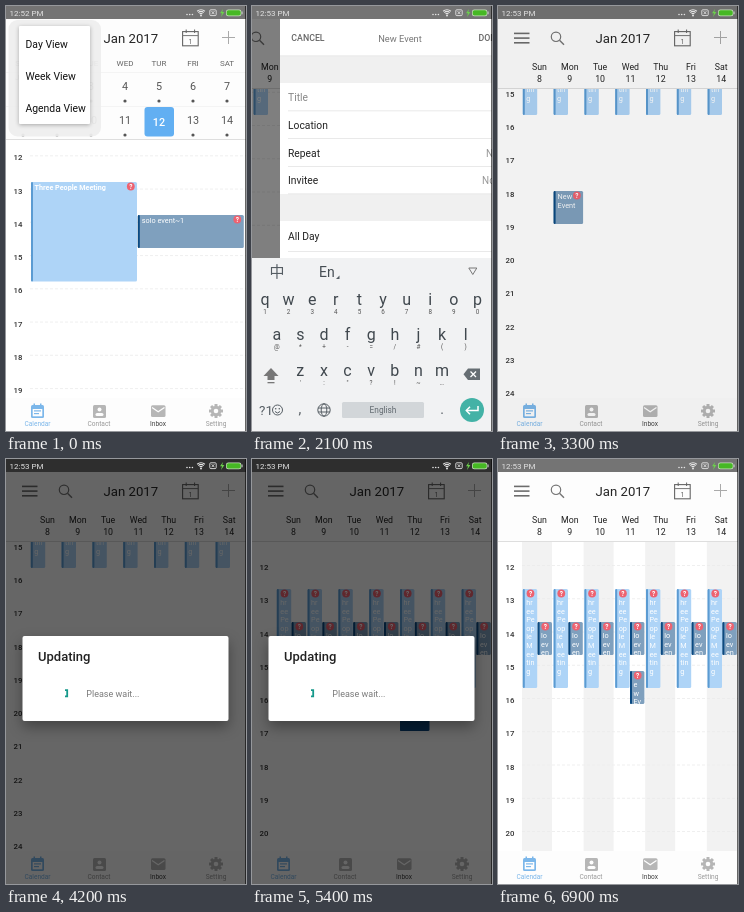
Animation, 240 px wide and 425 px high, one loop 7200 ms. Source, as an HTML page with a canvas:

```html
<!DOCTYPE html>
<html lang="en">
<head>
<meta charset="utf-8">
<title>Calendar</title>
<style>
html, body { margin: 0; width: 100%; height: 100%; overflow: hidden; background: #fff; }
canvas { display: block; width: 100vw; height: 100vh; }
</style>
</head>
<body>
<canvas id="stage"></canvas>
<script>
const W = 240, H = 425, STEP = 300, LOOP = 7200, HOUR = 33.25;
const canvas = document.getElementById('stage');
const ctx = canvas.getContext('2d');
const NAVY = '#0b4a82', SLATE = '#7fa0be', SKY = '#aed4f7', SKY_BAR = '#5b9bd2';
const BAR = '#fdfdfd';

function rect(x, y, w, h, fill, r = 0) {
  ctx.fillStyle = fill;
  ctx.beginPath();
  ctx.roundRect(x, y, w, h, r);
  ctx.fill();
}
function dot(x, y, r, fill) {
  ctx.fillStyle = fill;
  ctx.beginPath();
  ctx.arc(x, y, r, 0, 7);
  ctx.fill();
}
function ring(x, y, r, color, width = 1) {
  ctx.strokeStyle = color;
  ctx.lineWidth = width;
  ctx.beginPath();
  ctx.arc(x, y, r, 0, 7);
  ctx.stroke();
}
function line(points, color, width = 1, fill) {
  ctx.beginPath();
  for (let i = 0; i < points.length; i += 2) ctx.lineTo(points[i], points[i + 1]);
  if (fill) { ctx.closePath(); ctx.fillStyle = color; ctx.fill(); return; }
  ctx.strokeStyle = color;
  ctx.lineWidth = width;
  ctx.stroke();
}
function text(str, x, y, size, color = '#222', align = 'left', weight = 400) {
  ctx.font = `${weight} ${size}px Roboto, sans-serif`;
  ctx.fillStyle = color;
  ctx.textAlign = align;
  ctx.fillText(str, x, y);
}
function clipped(x, y, w, h, draw) {
  ctx.save();
  ctx.beginPath();
  ctx.rect(x, y, w, h);
  ctx.clip();
  draw();
  ctx.restore();
}
function shifted(dx, draw) {
  ctx.save();
  ctx.translate(dx, 0);
  draw();
  ctx.restore();
}

function statusIcons(time) {
  const ink = '#e4e4e4';
  text(time, 3.5, 9.6, 8, ink);
  for (let i = 0; i < 3; i++) dot(181 + i * 2.7, 8.5, 0.8, ink);
  ctx.strokeStyle = ink;
  ctx.lineWidth = 1.1;
  for (const r of [2.2, 4, 5.8]) {
    ctx.beginPath();
    ctx.arc(195, 9.6, r, -2.3, -0.84);
    ctx.stroke();
  }
  dot(195, 9.4, 1, ink);
  ctx.lineWidth = 0.9;
  ctx.beginPath();
  ctx.roundRect(203.8, 3.8, 6.4, 5.8, 1);
  ctx.stroke();
  line([205.6, 5.2, 208.4, 8.2], ink, 0.9);
  line([208.4, 5.2, 205.6, 8.2], ink, 0.9);
  line([217, 3, 214, 7.3, 216, 7.3, 215, 11, 218.4, 6, 216.3, 6], '#6bd04c', 1, true);
  rect(220, 3.6, 15.4, 6.6, '#c4dcba', 2.3);
  rect(220.7, 4.3, 14, 5.2, '#46b824', 1.8);
  rect(235.6, 5.6, 1, 2.6, '#ccc');
}

function appBar() {
  rect(0, 13, W, 70, BAR);
  for (const y of [26.6, 31.3, 36]) rect(16, y, 15.5, 1.6, '#6c6c6c');
  ring(58, 30.8, 4.7, '#757575', 1.2);
  line([61.5, 34.3, 66, 38.8], '#757575', 1.4);
  text('Jan 2017', 124.8, 37, 13.2, '#252525', 'center');
  ctx.strokeStyle = '#666';
  ctx.lineWidth = 1.1;
  ctx.strokeRect(176.6, 25.6, 15.6, 14.2);
  line([176.6, 29.6, 192.2, 29.6], '#777');
  line([180.2, 23.5, 180.2, 27], '#666');
  line([188.6, 23.5, 188.6, 27], '#666');
  text('1', 184.4, 37.6, 7, '#666', 'center');
  line([216, 31.5, 229, 31.5], '#aaa');
  line([222.5, 25, 222.5, 38], '#aaa');
}

function tabBar() {
  rect(0, 392, W, 33, BAR);
  const blue = '#7cb7ea', gray = '#b6b6b6';
  rect(25, 399, 13, 13, blue, 1.5);
  rect(26.7, 403, 9.6, 7.3, BAR);
  rect(28, 404.3, 7, 1.2, blue);
  rect(28, 407, 5, 1.2, blue);
  rect(27.5, 397.5, 1.5, 3, blue);
  rect(34, 397.5, 1.5, 3, blue);
  rect(87, 399, 13, 13, gray, 1.5);
  dot(93.5, 403.5, 2, BAR);
  rect(89.5, 407, 8, 3, BAR, 1.5);
  rect(145, 399.3, 14.5, 11.7, gray, 1.5);
  line([146, 401.5, 152.2, 405.7, 158.5, 401.5], BAR, 1.3);
  for (let i = 0; i < 4; i++) {
    const a = i * Math.PI / 4, c = Math.cos(a) * 7, s = Math.sin(a) * 7;
    line([210 - c, 405 - s, 210 + c, 405 + s], gray, 3);
  }
  dot(210, 405, 5.2, gray);
  dot(210, 405, 2.3, BAR);
  [['Calendar', 31.5, blue], ['Contact', 93, '#999'], ['Inbox', 152, '#444'], ['Setting', 210, '#999']]
    .forEach(([name, x, color]) => text(name, x, 420, 6.6, color, 'center'));
}

function hourGrid(firstY, top, dashes = true) {
  for (let hour = 9; hour <= 24; hour++) {
    const y = firstY + (hour - 12) * HOUR;
    if (y < top - 5 || y > 395) continue;
    if (dashes) {
      ctx.setLineDash([3, 2]);
      line([24, y - 1.5, W, y - 1.5], '#ebebeb', 0.8);
      ctx.setLineDash([]);
    }
    text(hour, 7.5, y + 3, 7.8, '#333', 'left', 500);
  }
}

function badge(x, y) {
  dot(x, y, 3.9, '#ee6270');
  text('?', x, y + 2.3, 6.5, '#fff', 'center', 700);
}
function block(x, y, w, h, fill, bar) {
  rect(x, y, w, h, fill, 1.5);
  rect(x, y, 2, h, bar, 1);
}
function narrowEvent(x, y, w, h, fill, bar, lines) {
  block(x, y, w, h, fill, bar);
  clipped(x, y, w, h, () => lines.forEach((s, i) =>
    text(s, x + 3.5, y + 16 + i * 8.6, 7.3, '#fff')));
  badge(x + 7.7, y + 4.5);
}
function wideEvent(x, y, fill) {
  block(x, y, 29.5, 33, fill, NAVY);
  text('New', x + 4, y + 8, 7.3, '#fff');
  text('Event', x + 4, y + 16.8, 7.3, '#fff');
  badge(x + 23.3, y + 4.5);
}

function dayView() {
  rect(0, 0, W, H, '#fff');
  hourGrid(151.3, 134);
  appBar();
  rect(0, 50, W, 84, BAR);
  rect(0, 66, W, 0.6, '#ececec');
  rect(0, 100, W, 0.6, '#ececec');
  rect(0, 133, W, 1, '#dedede');
  text('J', 9, 74, 8, '#888');
  ['SUN', 'MON', 'TUE', 'WED', 'TUR', 'FRI', 'SAT'].forEach((name, i) => {
    const x = 17 + i * 34;
    text(name, x, 60, 8, '#666', 'center');
    for (let row = 0; row < 2; row++) {
      const day = i + 1 + row * 7, today = day === 12;
      if (today) rect(138.5, 101, 29.5, 29.5, '#62aff2', 3);
      text(day, x, 84 + row * 34.3 + (today ? 1.7 : 0), 10.8, today ? '#fff' : '#555', 'center', today ? 500 : 400);
      if (!today) dot(x, 95 + row * 34, 1.6, '#555');
    }
  });
  block(25, 176, 106, 99.5, SKY, SKY_BAR);
  text('Three People Meeting', 28.5, 184, 7.2, '#fff', 'left', 700);
  badge(124.8, 180.5);
  block(131.8, 209, 106, 33, SLATE, NAVY);
  text('solo event~1', 135.8, 216.8, 7.3, '#fff');
  badge(231.3, 213.5);
  tabBar();
  rect(2.5, 14, 92.5, 116.5, 'rgba(238,238,238,.94)', 9);
  ctx.save();
  ctx.shadowColor = 'rgba(0,0,0,.3)';
  ctx.shadowBlur = 4;
  ctx.shadowOffsetY = 1;
  rect(13, 20, 71, 98, '#fff', 1);
  ctx.restore();
  ['Day View', 'Week View', 'Agenda View'].forEach((s, i) => text(s, 19.5, 42 + i * 32, 10.4, '#111'));
}

const column = day => 24 + day * 30.8;

function weekView({ scroll = 0, event, ghost, dim = 0 }) {
  rect(0, 0, W, H, '#fff');
  const plain = dim > 0;
  if (!plain) for (let day = 0; day < 7; day += 2) rect(column(day), 83, 30, 309, '#f2f2f2');
  clipped(0, 83, W, 309, () => {
    hourGrid(108 + scroll, 83, !plain);
    for (let day = 0; day < 7; day++) {
      const x = column(day);
      narrowEvent(x + 0.8, 130 + scroll, 14.4, 99, SKY, SKY_BAR,
        ['hr', 'ee', 'Pe', 'op', 'le', 'M', 'ee', 'tin', 'g']);
      narrowEvent(x + 15.6, 163 + scroll, 14.4, 33, SLATE, NAVY, ['lo', 'ev', 'en']);
    }
    if (event) {
      const x = column(event.day), y = event.y + scroll, fill = ghost || event.dark ? NAVY : SLATE;
      if (event.half) narrowEvent(x + 15.6, y, 14.4, 33, fill, NAVY, ['e', 'w', 'Ev']);
      else wideEvent(x + 0.8, y, fill);
    }
    if (ghost) {
      ctx.globalAlpha = 0.75;
      wideEvent(ghost.x - 14.7, ghost.y, '#6f92b3');
      dot(ghost.x, ghost.y + 17, 7.5, 'rgba(225,232,238,.55)');
      dot(ghost.x, ghost.y + 17, 4.5, 'rgba(255,255,255,.6)');
      ctx.globalAlpha = 1;
      text(ghost.label, ghost.x + 1, ghost.y - 11, 14, 'rgba(70,70,70,.85)', 'center');
    }
  });
  appBar();
  rect(0, 82, W, 1, '#dedede');
  ['Sun', 'Mon', 'Tue', 'Wed', 'Thu', 'Fri', 'Sat'].forEach((name, i) => {
    text(name, 41.5 + i * 30.3, 64, 8.8, '#222', 'center');
    text(8 + i, 41.5 + i * 30.3, 76.3, 8.8, '#222', 'center');
  });
  tabBar();
}

function dialog() {
  ctx.save();
  ctx.shadowColor = 'rgba(0,0,0,.35)';
  ctx.shadowBlur = 14;
  ctx.shadowOffsetY = 6;
  rect(16.5, 177, 206, 85, '#fff', 2);
  ctx.restore();
  text('Updating', 32, 202, 13, '#222', 'left', 500);
  line([59, 231.2, 61.2, 231.2, 61.2, 237.3, 59, 237.3], '#16998b', 1.8);
  text('Please wait...', 80.3, 237.5, 9, '#7b7b7b');
}

function form() {
  rect(0, 13, W, 240, '#fff');
  rect(0, 50, W, 27, '#f0f0f0');
  rect(0, 188, W, 27, '#f0f0f0');
  for (const y of [49.5, 104.5, 132, 160, 187.5, 245]) rect(y > 60 ? 8 : 0, y, W, 0.8, '#e2e2e2');
  text('CANCEL', 11.3, 35.3, 8.8, '#666', 'left', 500);
  text('New Event', 120, 35.5, 9.3, '#777', 'center');
  text('DONE', 198.5, 35.3, 8.8, '#666', 'left', 500);
  [['Title', 95], ['Location', 122.7], ['Repeat', 150.5], ['Invitee', 178.2], ['All Day', 234.2]]
    .forEach(([s, y], i) => text(s, 8, y, 10.3, i ? '#222' : '#888'));
  text('Never', 206, 150.5, 10, '#999');
  text('None', 202, 178.2, 10, '#999');
}

function keyRow(keys, marks, x, y) {
  [...keys].forEach((key, i) => {
    text(key, x + i * 23.6, y, 16, '#40484e', 'center');
    text(marks[i], x + i * 23.6, y + 9, 6.3, '#555', 'center');
  });
}
function keyboard() {
  const ink = '#555d63';
  rect(0, 252, W, 173, '#f1f2f3');
  ctx.font = '15px "Noto Sans CJK SC", "Noto Sans CJK JP", sans-serif';
  ctx.fillStyle = ink;
  ctx.textAlign = 'center';
  ctx.fillText('中', 25, 271);
  text('En', 67, 270.5, 14, '#444c52');
  line([87.5, 269.5, 87.5, 273, 84, 273], ink, 1, true);
  line([216.8, 262, 224.8, 262, 220.8, 268.5, 216.8, 262], '#777');
  keyRow('qwertyuiop', '1234567890', 13, 299);
  keyRow('asdfghjkl', '@*+-=/#()', 24.8, 334.3);
  keyRow('zxcvbnm', '\':"?!~…', 48.3, 369.7);
  line([19, 362, 26.5, 370, 22.5, 370, 22.5, 374, 15.5, 374, 15.5, 370, 11.5, 370], '#777', 1, true);
  rect(15.5, 376, 7, 1.3, '#777');
  line([211.5, 368.3, 216, 362.5, 228, 362.5, 228, 374, 216, 374], '#666e73', 1, true);
  line([218.5, 365.5, 224, 371], '#fff', 1.2);
  line([224, 365.5, 218.5, 371], '#fff', 1.2);
  text('?1', 7, 409, 13.5, ink);
  ring(25.5, 404, 5, ink);
  dot(23.7, 402.7, 0.8, ink);
  dot(27.3, 402.7, 0.8, ink);
  line([23, 405.5, 25.5, 407, 28, 405.5], ink);
  text(',', 48, 408, 14, ink, 'center');
  ring(72, 404, 6.2, ink);
  ctx.beginPath();
  ctx.ellipse(72, 404, 2.8, 6.2, 0, 0, 7);
  ctx.stroke();
  line([66, 402, 78, 402], ink);
  line([66, 406, 78, 406], ink);
  rect(90, 396, 82, 16, '#d2d6d9', 1.5);
  text('English', 131, 407, 8.3, '#626a70', 'center');
  text('.', 190, 408, 14, ink, 'center');
  dot(220, 404, 12, '#43b2a6');
  line([226, 400, 226, 404.5, 214.5, 404.5], '#fff', 1.5);
  line([218, 400.8, 214.3, 404.5, 218, 408.2], '#fff', 1.5);
}

const monday = { day: 1, y: 305 }, thursday = { day: 4, y: 239 };
const wednesday = { day: 3, y: 196, half: true }, later = { ...wednesday, y: 212 };
const low = -120;
const updating = (event, scroll = 0) => ({ scroll, event: { ...event, dark: true }, dim: 0.6, dialog: true });

// One entry per 300 ms step.
const scenes = [
  { day: true },
  { scroll: 25 },
  { scroll: 25 },
  { scroll: -40 },
  { scroll: low },
  { scroll: low },
  { scroll: low, form: 0 },
  { scroll: low, form: 28 },
  { scroll: low, event: monday },
  { scroll: low, event: monday },
  updating(monday, low),
  { scroll: low, event: monday, dim: 0.05 },
  { scroll: low, event: monday },
  { scroll: low, event: monday, ghost: { x: 161, y: 126, label: 'Thu 16:00' } },
  updating(monday, low),
  { scroll: low, event: thursday },
  { event: thursday, ghost: { x: 142.8, y: 152.5, label: 'Wed 13:15' } },
  updating(thursday),
  updating(thursday),
  updating(thursday),
  { event: wednesday },
  { event: wednesday, ghost: { x: 157, y: 213, label: 'Wed 15:15' } },
  updating(wednesday),
  { event: later }
];

function draw(index) {
  const scene = scenes[index];
  if (scene.day) dayView();
  else if (scene.form !== undefined) {
    shifted(scene.form ? -54 : 0, () => weekView(scene));
    rect(0, 13, W, H, 'rgba(0,0,0,.5)');
    shifted(scene.form, form);
    keyboard();
  } else weekView(scene);
  rect(0, 0, W, 13, '#747474');
  if (scene.dim) rect(0, 0, W, H, `rgba(0,0,0,${scene.dim})`);
  statusIcons(index < 6 ? '12:52 PM' : '12:53 PM');
  if (scene.dialog) dialog();
  rect(W - 1, 0, 1, H, 'rgba(0,0,0,.6)');
}

function frame() {
  const ratio = window.devicePixelRatio || 1;
  const width = Math.round(innerWidth * ratio), height = Math.round(innerHeight * ratio);
  if (canvas.width !== width || canvas.height !== height) {
    canvas.width = width;
    canvas.height = height;
  }
  ctx.setTransform(width / W, 0, 0, height / H, 0, 0);
  draw(Math.floor(performance.now() % LOOP / STEP));
  requestAnimationFrame(frame);
}
frame();
</script>
</body>
</html>
```
